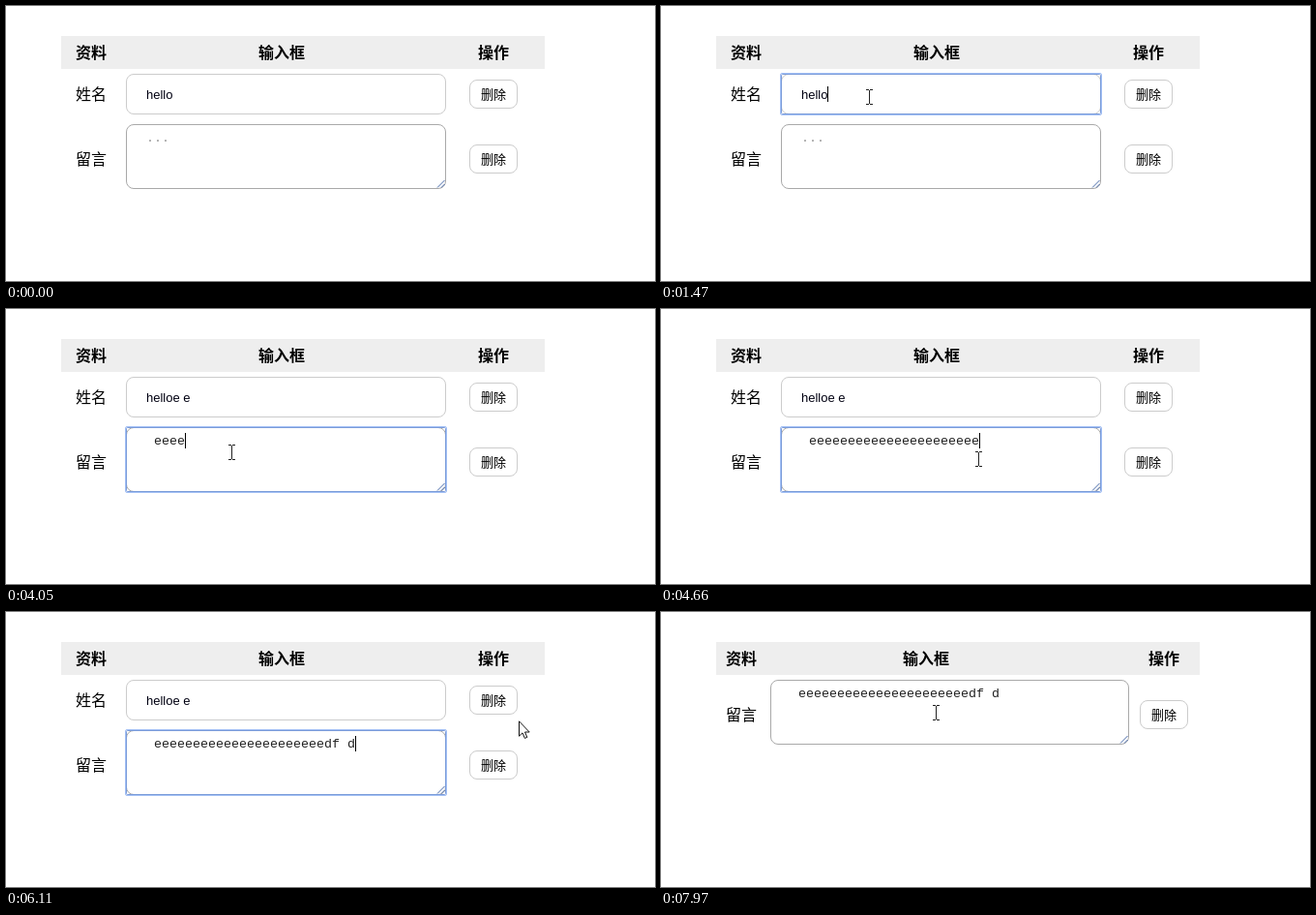
An HTML page for the animation above (8000 ms loop, 671 by 284 pixels).

```html
<!DOCTYPE html>
<html lang="zh-CN">
<head>
<meta charset="utf-8">
<title>输入框</title>
<style>
  html, body { margin: 0; width: 100%; height: 100%; overflow: hidden; background: #fff; }
  svg { display: block; width: 671px; height: 284px; }
  text { font: 16px "Noto Sans CJK SC", "Noto Sans CJK", sans-serif; white-space: pre; }
  .head text { font-weight: bold; }
  .btn rect { fill: #fff; stroke: #ccc; }
  .btn.hover rect { fill: #ccc; }
  .btn text { font-size: 13px; }
  #name { font: 13px "Liberation Sans", Arial, sans-serif; fill: #001; }
  #msg, #hint { font: 13.333px "Liberation Mono", "Courier New", monospace; }
  #msg { fill: #222; }
  #hint { fill: #999; }
  .field { fill: #fff; stroke: #ccc; }
  #area { stroke: #a9a9a9; width: 330px; }
  #ring { fill: none; }
  .glow { stroke: #a3c0f5; }
  .edge { stroke: #7b9cd9; }
  #grip { fill: none; stroke: #4668a8; }
  #beam { fill: none; stroke: #222; }
  #arrow { fill: #fff; stroke: #111; }

  /* Columns after the first row is gone */
  .short #h1, .short #label2 { transform: translateX(-5px); }
  .short #h2, .short #msg, .short #area { transform: translateX(-11px); }
  .short #h3, .short #btn2 { transform: translateX(16px); }
  .short #area { width: 370px; }
  .short #grip { transform: translateX(29px); }
  .short #row1 { display: none; }
  .short #row2 { transform: translateY(-52px); }
</style>
</head>
<body>
<svg id="stage" viewBox="0 0 671 284">
  <rect x="57" y="31" width="500" height="34" fill="#eee"/>
  <g class="head">
    <text id="h1" x="72" y="54">资料</text>
    <text id="h2" x="261" y="54">输入框</text>
    <text id="h3" x="488" y="54">操作</text>
  </g>
  <g id="row1">
    <text x="72" y="97">姓名</text>
    <rect class="field" x="124.5" y="70.5" width="330" height="41" rx="7.5"/>
    <text id="name" x="145" y="96"></text>
    <g class="btn" id="btn1">
      <rect x="479.5" y="76.5" width="49" height="29" rx="7.5"/>
      <text x="491" y="96">删除</text>
    </g>
  </g>
  <g id="row2">
    <text id="label2" x="72" y="164">留言</text>
    <rect class="field" id="area" x="124.5" y="122.5" height="66" rx="7.5"/>
    <path id="grip" d="M446 187.5l7.5-7.5M450 187.5l3.5-3.5"/>
    <text id="hint" x="145" y="140">...</text>
    <text id="msg" x="145" y="140"></text>
    <g class="btn" id="btn2">
      <rect x="479.5" y="143.5" width="49" height="29" rx="7.5"/>
      <text x="491" y="163">删除</text>
    </g>
  </g>
  <g id="ring">
    <rect class="glow" x="123.5" width="332" rx="1.5"/>
    <rect class="edge" x="124.5" width="330" rx="1"/>
  </g>
  <rect id="caret" width="1" height="16"/>
  <g id="cursor">
    <path id="beam" d="M-3 -7.5h3M1 -7.5h3M.5 -7V7M-3 7.5h3M1 7.5h3"/>
    <path id="arrow" d="M.5 .8V16.2L4 12.9L6.4 18.4L8.8 17.4L6.5 12H11.2Z"/>
  </g>
</svg>
<script>
const LOOP = 8000, STEP = 77.4, ENTER = 68, BLINK = 530;
const FOCUS_NAME = 1440, FOCUS_MSG = 2770, IDLE = 5600, PRESS = 6875, REMOVE = 6950;

// Keystrokes: first key, gap between keys, text
const nameRuns = [[1990, 195, "e e"]];
const msgRuns = [
  [3310, 80, " e"], [3700, 150, "eee"], [4040, 33.4, "e".repeat(18)], [5250, 125, "df d"]
];

// Pointer stops: arrival time, x, y
const stops = [
  [ENTER, 518, 257], [200, 465, 234], [780, 350, 172], [1150, 233, 111], [1390, 215, 94],
  [2720, 233, 148], [4500, 328, 155], [4830, 389, 179], [5060, 343, 176],
  [6100, 530, 112], [6360, 516, 96], [7130, 535, 100], [7590, 259, 101], [7740, 284, 104]
];

const ui = {};
document.querySelectorAll("[id]").forEach(el => ui[el.id] = el);
const set = (el, attrs) => { for (const k in attrs) el.setAttribute(k, attrs[k]); };
const show = (el, on) => { el.style.display = on ? "" : "none"; };
const write = (el, s) => { if (el.textContent !== s) el.textContent = s; };
const inside = ([x, y], left, top, w, h) => x >= left && x < left + w && y >= top && y < top + h;
const ease = k => k * k * (3 - 2 * k);

// The screen refreshes at a fixed interval
const sample = t => ENTER + Math.floor((t - ENTER) / STEP) * STEP;

const typed = (runs, t) => runs.map(([start, gap, s]) =>
  s.slice(0, Math.max(0, Math.floor((t - start) / gap) + 1))).join("");

// Longer moves take more time; each ends at its arrival time
function pointer(t) {
  let [, x, y] = stops[0];
  stops.slice(1).forEach(([end, toX, toY], i) => {
    const [, fromX, fromY] = stops[i];
    const time = 60 + 1.3 * Math.hypot(toX - fromX, toY - fromY);
    const k = ease(Math.min(1, Math.max(0, (t - end) / time + 1)));
    x += (toX - fromX) * k;
    y += (toY - fromY) * k;
  });
  return [Math.round(x), Math.round(y)];
}

function drawFocus(t) {
  const focused = t >= FOCUS_NAME && t < PRESS;
  const blink = t > IDLE && Math.floor((t - IDLE) / BLINK) % 2;
  show(ui.ring, focused);
  show(ui.caret, focused && !blink);
  if (!focused) return;
  const inMsg = t >= FOCUS_MSG;
  const field = inMsg ? ui.msg : ui.name;
  const [top, height] = inMsg ? [122, 67] : [70, 42];
  const width = field.textContent ? field.getComputedTextLength() : 0;
  set(ui.ring.children[0], { y: top - .5, height: height + 1 });
  set(ui.ring.children[1], { y: top + .5, height: height - 1 });
  set(ui.caret, { x: Math.floor(145.05 + width), y: inMsg ? 128 : 83 });
}

function drawPointer(t, removed) {
  const p = pointer(t), visible = t >= ENTER;
  const overText = removed
    ? inside(p, 113, 70, 371, 67)
    : inside(p, 124, 70, 331, 42) || inside(p, 124, 122, 331, 67);
  show(ui.cursor, visible);
  show(ui.beam, overText);
  show(ui.arrow, !overText);
  set(ui.cursor, { transform: `translate(${p})` });
  const [x, y] = removed ? [495, 91] : [479, 143];
  ui.btn1.classList.toggle("hover", visible && inside(p, 479, 76, 50, 30));
  ui.btn2.classList.toggle("hover", visible && inside(p, x, y, 50, 30));
}

function render(t) {
  const removed = t >= REMOVE, message = typed(msgRuns, t);
  ui.stage.classList.toggle("short", removed);
  write(ui.name, "hello" + typed(nameRuns, t));
  write(ui.msg, message);
  show(ui.hint, !message);
  drawFocus(t);
  drawPointer(t, removed);
}

const start = performance.now();
function tick() {
  render(sample((performance.now() - start) % LOOP));
  requestAnimationFrame(tick);
}
tick();
</script>
</body>
</html>
```
